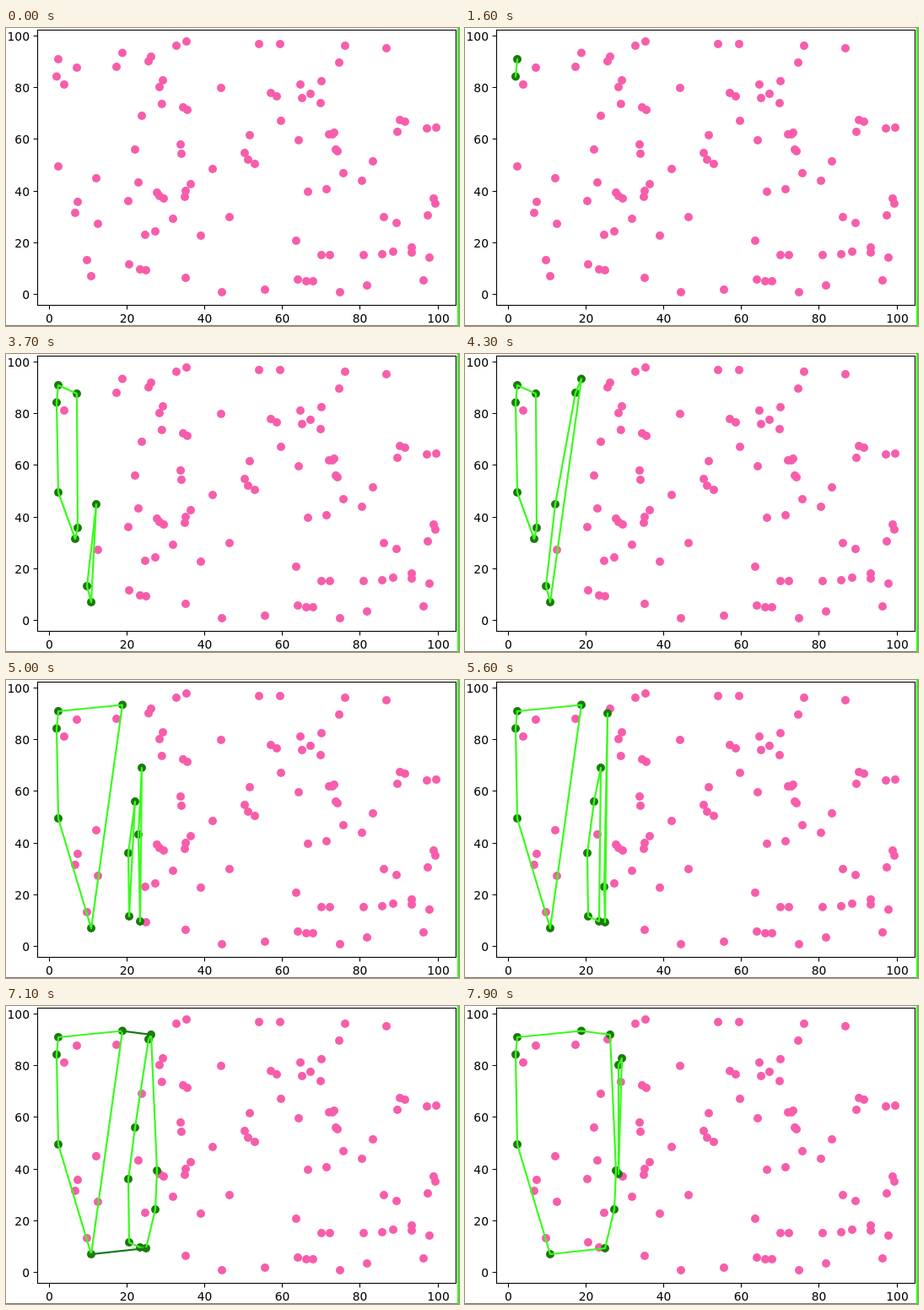
Write an HTML page that moves like this. It is 537 by 353 pixels and loops after 8 s.

```html
<!DOCTYPE html>
<html lang="en">
<head>
<meta charset="utf-8">
<title>Divide and conquer convex hull</title>
<style>
  html, body { margin: 0; width: 100%; height: 100%; overflow: hidden; background: #fff; }
  svg { display: block; width: 537px; height: 353px; }
  text { font: 13.89px "DejaVu Sans", sans-serif; }
  .axis { fill: none; stroke: #000; stroke-width: 1.1; }
  .hull { fill: none; stroke: #39fb1c; stroke-width: 2.2; stroke-linejoin: round; }
  .join { stroke: #1a7a14; stroke-width: 2.2; stroke-linecap: square; }
</style>
</head>
<body>
<svg viewBox="0 0 537 353">
  <rect x="0" y="352" width="537" height="1" fill="#777"/>
  <rect x="535" y="0" width="2" height="353" fill="#2cff10"/>
  <g id="axes"></g>
  <g id="dots"></g>
  <g id="lines"></g>
</svg>
<script>
const LOOP = 8000;
const PINK = '#f75dab', GREEN = '#1a7a0c';

// Points reached by the sweep, sorted by x
const swept = [
  [60, 57.5], [62, 37], [62, 164], [69, 67], [82, 219], [84, 47], [85, 206],
  [96, 275], [101, 294], [107, 178], [109, 232], [131, 46], [138, 29.5],
  [145, 205], [146, 280], [153, 144], [157, 183], [159, 286], [161, 104],
  [165, 245], [166, 287], [169, 39.5], [172, 34], [177, 241], [179, 195],
  [182, 70], [182, 199], [184.8, 90], [186, 62], [187, 202]
];

// Points to the right that stay untouched
const rest = [
  [198, 226], [202, 21], [207, 138], [208, 149], [210, 94], [212, 200], [213, 193],
  [213, 296], [214, 16], [215, 97], [219, 185], [231, 246], [245, 167], [255, 71],
  [256, 313], [265, 224], [283, 148], [287, 156], [289, 127], [295, 161], [300, 19],
  [307, 310], [314, 77], [321, 81], [325, 19], [326, 110], [344, 252], [346, 298],
  [347, 133], [349, 67], [351, 83], [356, 300], [358, 194], [361, 78], [364, 300],
  [373, 89], [374, 63], [374, 269], [380, 191], [383, 126], [384, 269], [387, 126],
  [389, 124], [391, 144], [393, 146], [395, 41], [396, 313], [400, 172], [402, 21],
  [422, 181], [424, 269], [428, 305], [435, 158], [446, 268], [448, 224], [451, 24],
  [459, 265], [463, 231], [464, 123], [467, 109], [473, 111], [481, 260], [481, 266],
  [495, 299], [499, 119], [500, 222], [502, 272], [507, 202], [509, 208], [510, 118]
];

// [time, first, last] draws a hull; a fourth value marks the split whose tangents are shown
const steps = [
  [1600, 1, 2], [1900, 3, 4], [2500, 1, 4, 2], [2800, 1, 4], [2800, 5, 7],
  [3400, 1, 7, 4], [3600, 1, 7], [3600, 8, 10], [3900, 11, 13],
  [4100, 8, 13, 10], [4300, 8, 13], [4600, 1, 13, 7], [4800, 1, 13],
  [4800, 14, 16], [5000, 17, 19], [5200, 14, 19, 16], [5500, 14, 19],
  [5500, 20, 22], [5900, 23, 25], [6100, 20, 25, 22], [6300, 20, 25],
  [6500, 14, 25, 19], [6800, 14, 25], [7100, 1, 25, 13],
  [7400, 26, 27], [7500, 28, 29], [7800, 1, 25], [7800, 26, 29, 27], [7900, 26, 29]
];

const $ = id => document.getElementById(id);
const at = i => swept[i - 1];

function cross(a, b, c) {
  const [ax, ay] = at(a), [bx, by] = at(b), [cx, cy] = at(c);
  return (bx - ax) * (cy - ay) - (by - ay) * (cx - ax);
}

function chain(ids) {
  const out = [];
  for (const i of ids) {
    while (out.length > 1 && cross(out.at(-2), out.at(-1), i) <= 0) out.pop();
    out.push(i);
  }
  return out.slice(0, -1);
}

function hull(first, last) {
  const ids = [];
  for (let i = first; i <= last; i++) ids.push(i);
  ids.sort((a, b) => at(a)[0] - at(b)[0] || at(a)[1] - at(b)[1]);
  return [...chain(ids), ...chain(ids.reverse())];
}

function drawAxes() {
  let s = '<rect class="axis" x="37.5" y="2.5" width="496" height="326"/>';
  for (let v = 0; v <= 100; v += 20) {
    const x = Math.round(51 + v * 4.605) + 0.5;
    const y = Math.round(315 - v * 3.06) + 0.5;
    s += `<path class="axis" d="M${x} 328.5v4.9M37.5 ${y}h-4.9"/>` +
      `<text x="${x}" y="349" text-anchor="middle">${v}</text>` +
      `<text x="28" y="${y + 5}" text-anchor="end">${v}</text>`;
  }
  $('axes').innerHTML = s;
}

const dot = ([x, y], color) => `<circle cx="${x}" cy="${y}" r="5" fill="${color}"/>`;

function drawStep(count) {
  let hulls = [], joins = [];
  for (const [, first, last, split] of steps.slice(0, count)) {
    if (split) {
      joins.push({ first, last, split });
    } else {
      const outside = h => h.first < first || h.last > last;
      hulls = hulls.filter(outside);
      joins = joins.filter(outside);
      hulls.push({ first, last, ids: hull(first, last) });
    }
  }

  const active = new Set(hulls.flatMap(h => h.ids));
  $('dots').innerHTML = rest.map(p => dot(p, PINK)).join('') +
    swept.map((p, i) => active.has(i + 1) ? '' : dot(p, PINK)).join('') +
    [...active].map(i => dot(at(i), GREEN)).join('');

  let s = hulls.map(h => `<path class="hull" d="M${h.ids.map(at).join('L')}Z"/>`).join('');
  for (const { first, last, split } of joins) {
    const ids = hull(first, last);
    ids.forEach((a, k) => {
      const b = ids[(k + 1) % ids.length];
      if ((a <= split) !== (b <= split)) s += `<path class="join" d="M${at(a)}L${at(b)}"/>`;
    });
  }
  $('lines').innerHTML = s;
}

let shown = -1;
function tick() {
  const t = performance.now() % LOOP;
  const count = steps.filter(s => s[0] <= t).length;
  if (count !== shown) drawStep(shown = count);
  requestAnimationFrame(tick);
}

drawAxes();
tick();
</script>
</body>
</html>
```
